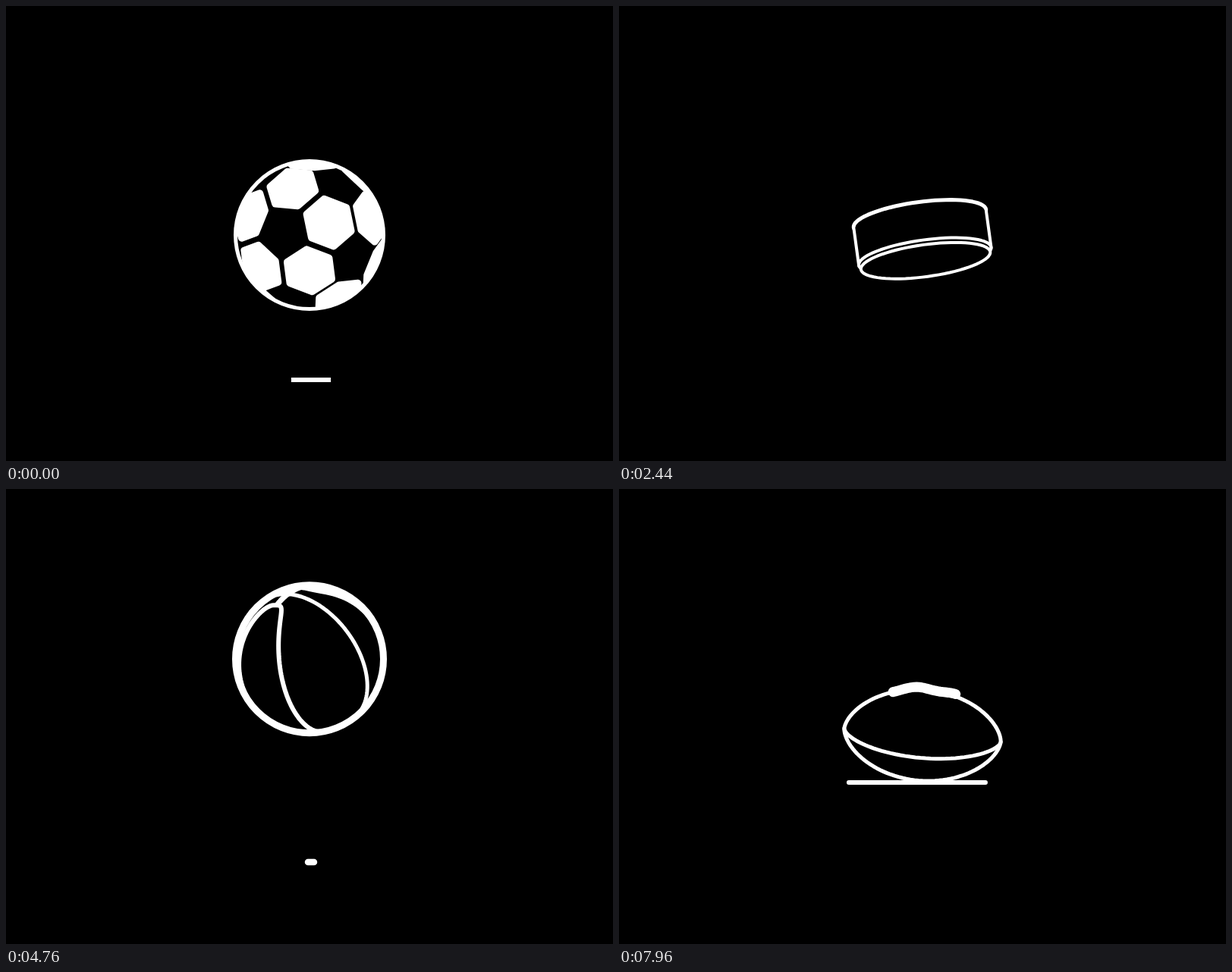
Animation, 800 px wide and 600 px high, one loop 8 s. Source, as an HTML page with a canvas:

```html
<!DOCTYPE html>
<html lang="en">
<head>
<meta charset="utf-8">
<title>Bouncing balls</title>
<style>
  html, body { margin: 0; width: 100%; height: 100%; overflow: hidden; background: #000; }
  canvas { display: block; }
</style>
</head>
<body>
<canvas id="stage" width="800" height="600"></canvas>
<script>
const ctx = document.getElementById('stage').getContext('2d');
const LOOP = 8000, STEP = 40, TAU = Math.PI * 2, RAD = Math.PI / 180;
const SPIN_AXIS = unit([-0.68, -0.68, 0.277]);

function dot(a, b) { return a[0] * b[0] + a[1] * b[1] + a[2] * b[2]; }
function cross(a, b) {
  return [a[1] * b[2] - a[2] * b[1], a[2] * b[0] - a[0] * b[2], a[0] * b[1] - a[1] * b[0]];
}
// Weighted sum of vectors: mix(k1, v1, k2, v2, ...)
function mix(...parts) {
  const out = [0, 0, 0];
  for (let i = 0; i < parts.length; i += 2)
    for (let j = 0; j < 3; j++) out[j] += parts[i] * parts[i + 1][j];
  return out;
}
function unit(v) { return mix(1 / Math.sqrt(dot(v, v)), v); }
function spin(v, angle) {
  const c = Math.cos(angle), s = Math.sin(angle);
  return mix(c, v, s, cross(SPIN_AXIS, v), (1 - c) * dot(SPIN_AXIS, v), SPIN_AXIS);
}
function signedPower(x, power) { return Math.sign(x) * Math.abs(x) ** power; }

function trace(points) {
  ctx.beginPath();
  points.forEach(p => ctx.lineTo(p[0], p[1]));
}
function stroke(width) { ctx.lineWidth = width; ctx.stroke(); }
function ground(x, y, length, width, cap) {
  ctx.lineCap = cap;
  trace([[x - length / 2, y], [x + length / 2, y]]);
  stroke(width);
  ctx.lineCap = 'round';
}
function sample(count, from, to, fn) {
  return Array.from({ length: count + 1 }, (_, i) => fn(from + (to - from) * i / count));
}

// Free fall between apexes; the ball flattens where it would pass the floor.
function bounce(t, { apexTime, period, top, drop, radius }) {
  const phase = (((t - apexTime) / period + 0.5) % 1 + 1) % 1 - 0.5;
  const fallen = 4 * phase * phase;
  const y = top + drop * fallen;
  return { y, fallen, flat: Math.min(1, (495 - y) / radius) };
}
function drawBouncing(state, rimWidth, paint) {
  ctx.save();
  ctx.translate(400, state.y);
  ctx.scale(1 / state.flat, state.flat);
  const rim = new Path2D();
  rim.arc(0, 0, 97.5, 0, TAU);
  ctx.save();
  ctx.clip(rim);
  paint();
  ctx.restore();
  ctx.lineWidth = rimWidth;
  ctx.stroke(rim);
  ctx.restore();
}

// Soccer ball: white hexagons of a truncated icosahedron
const hexagons = (() => {
  const pole = unit([-0.36, -0.04, 0.93]);
  const toward = [0.26, -0.17, 0.95];
  const a = unit(mix(1, toward, -dot(toward, pole), pole));
  const b = cross(pole, a);
  const half = [pole];
  for (let k = 0; k < 5; k++) {
    const angle = (36 + 72 * k) * RAD;
    half.push(mix(0.4472, pole, 0.8944 * Math.cos(angle), a, 0.8944 * Math.sin(angle), b));
  }
  const corners = [...half, ...half.map(v => mix(-1, v))];
  const near = (u, v) => dot(u, v) > 0.4;
  const faces = [];
  corners.forEach((A, i) => corners.forEach((B, j) => corners.forEach((C, k) => {
    if (i >= j || j >= k || !near(A, B) || !near(B, C) || !near(A, C)) return;
    const center = mix(1, A, 1, B, 1, C);
    const shrink = 0.76;
    const rim = [[A, B], [B, A], [B, C], [C, B], [C, A], [A, C]]
      .map(([u, v]) => mix(1 - shrink, center, shrink * 2, u, shrink, v))
      .map(v => mix(1 / 2.605, v));
    faces.push({ center: unit(center), rim });
  })));
  return faces;
})();

function toDisc(v) {
  const reach = 105;
  const k = v[2] < 0 ? reach / Math.hypot(v[0], v[1]) : reach;
  return [v[0] * k, v[1] * k];
}

const SOCCER = { apexTime: -315, period: 880, top: 196, drop: 207, radius: 100 };
function soccer(t) {
  const state = bounce(t, SOCCER), angle = TAU * t / 880;
  ground(402, 493, 4 + 94 * state.fallen, 6, 'butt');
  drawBouncing(state, 5, () => {
    for (const { center, rim } of hexagons) {
      if (spin(center, angle)[2] < -0.1) continue;
      trace(rim.map(v => toDisc(spin(v, angle))));
      ctx.closePath();
      ctx.fill();
      stroke(9);
    }
  });
}

// Puck: tumbling cylinder
function puck(t) {
  const tilt = 75.8 * RAD + TAU * (t - 2440) / 820;
  let axis = [0.135 * Math.sin(tilt), 0.991 * Math.sin(tilt), Math.cos(tilt)];
  if (axis[2] < 0) axis = mix(-1, axis);
  const across = unit([axis[1], -axis[0], 0]);
  const up = cross(axis, across);
  const circle = (r, depth) => sample(72, 0, TAU, q =>
    mix(depth, axis, r * Math.cos(q), across, r * Math.sin(q), up));
  const side = s => [mix(-27, axis, s * 88, across), mix(26, axis, s * 88, across)];
  const left = side(-1), right = side(1);

  ctx.save();
  ctx.translate(400, 306);
  ctx.fillStyle = '#000';
  trace(circle(88, -27));
  stroke(5);
  trace([...left, right[1], right[0]]);
  ctx.fill();
  trace(circle(88, 25));
  ctx.fill();
  stroke(4);
  [left, right].forEach(line => { trace(line); stroke(4); });
  trace(circle(86, 31));
  ctx.fill();
  stroke(4);
  ctx.restore();
}

// Basketball: seams as curves on a sphere, c / p / q being its own axes
const BASKET = { apexTime: 5716, period: 820, top: 202, drop: 202, radius: 102 };
const BALL_AXES = [[0, 0, -1], unit([-0.42, -0.91, 0])];
BALL_AXES.push(cross(...BALL_AXES));

function seamLoop(sign, width, shift) {
  return q => {
    const s = Math.sin(q);
    const along = 0.966 * Math.cos(q);
    const side = width * signedPower(s, 0.75) + shift * Math.abs(s);
    return [sign * Math.sqrt(Math.max(0, 1 - along * along - side * side)), along, side];
  };
}
const seams = [
  { width: 7, points: sample(80, -14 * RAD, 194 * RAD, q => [Math.sin(q), Math.cos(q), 0]) },
  { width: 5, points: sample(120, 0, TAU, q => [0, Math.cos(q), Math.sin(q)]) },
  { width: 6, points: sample(120, 0, TAU, seamLoop(1, 0.68, 0)) },
  { width: 6, points: sample(120, 0, TAU, seamLoop(-1, 0.44, 0.09)) }
];

function basketball(t) {
  const state = bounce(t, BASKET);
  const angle = 862 * RAD * (t - 3840) / 1920;
  const [c, p, q] = BALL_AXES.map(v => spin(v, angle));
  ground(402, 492, 2 + 54 * state.fallen, 8.5, 'round');
  drawBouncing(state, 9, () => {
    for (const { width, points } of seams) {
      ctx.beginPath();
      let open = false;
      for (const [i, j, k] of points) {
        const v = mix(97 * i, c, 97 * j, p, 97 * k, q);
        if (v[2] < 0) { open = false; continue; }
        open ? ctx.lineTo(v[0], v[1]) : ctx.moveTo(v[0], v[1]);
        open = true;
      }
      stroke(width);
    }
  });
}

// Football: turns on the floor while rolling about its long axis
const LONG = 103.5, SHORT = 60;
function meridian(q, depth) {
  return [LONG * Math.cos(q), SHORT * depth * signedPower(Math.sin(q), 1.2)];
}
const footballRim = sample(120, 0, TAU, q => meridian(q, 1));

function football(t) {
  const turn = (-57 + 242 * (t - 7040) / 920) * RAD;
  const roll = (196 - 106 * (t - 7040) / 920) * RAD;
  const c = Math.cos(turn), s = Math.sin(turn);
  const high = Math.max(...footballRim.map(([x, y]) => x * s + y * c));
  const wide = Math.max(...footballRim.map(([x, y]) => x * c - y * s));
  ground(393 - 10 * s * s, 387, 2.24 * wide - 51, 6, 'round');

  ctx.save();
  ctx.translate(400, 385 - high);
  ctx.rotate(turn);
  trace(footballRim);
  stroke(5);
  for (let k = 0; k < 3; k++) {
    const angle = roll + k * TAU / 3;
    const depth = Math.sin(angle);
    if (Math.cos(angle) > 0.01) {
      trace(sample(48, 0, Math.PI, q => meridian(q, depth)));
      stroke(5);
    }
    if (k === 0 && Math.cos(angle) > -0.25) {
      trace(sample(24, 65 * RAD, 112 * RAD, q => {
        const [x, y] = meridian(q, depth * 1.03);
        return [x, y + 1.5 * Math.sin(x / 9)];
      }));
      stroke(13);
    }
  }
  ctx.restore();
}

function draw(t) {
  ctx.fillStyle = '#000';
  ctx.fillRect(0, 0, 800, 600);
  ctx.fillStyle = ctx.strokeStyle = '#fff';
  ctx.lineCap = ctx.lineJoin = 'round';
  if (t < 1760) soccer(t);
  else if (t < 2960) puck(t);
  else if (t < 6000) basketball(t);
  else football(t);
}

const start = performance.now();
function frame() {
  const t = (performance.now() - start) % LOOP;
  draw(Math.floor(t / STEP) * STEP);
  requestAnimationFrame(frame);
}
frame();
</script>
</body>
</html>
```
